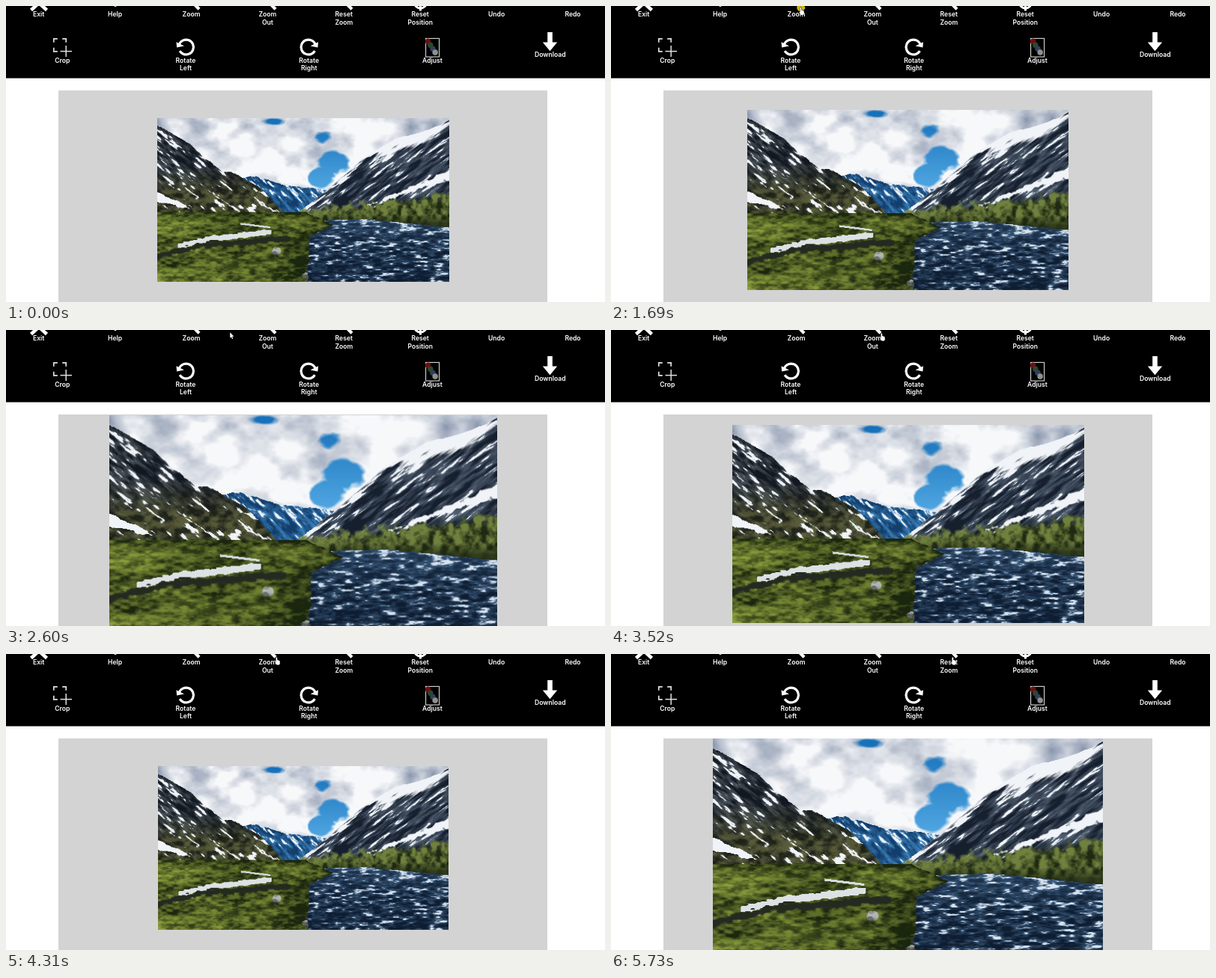
Recreate the animation shown at these times as an HTML page with a canvas. Size 800x396 px, loop 6.04 s.

```html
<!DOCTYPE html>
<html lang="en">
<head>
<meta charset="utf-8">
<title>Image editor zoom</title>
<style>
  html, body { margin: 0; width: 100%; height: 100%; overflow: hidden; background: #fff; }
  canvas { display: block; }
</style>
</head>
<body>
<canvas id="stage" width="800" height="396"></canvas>
<script>
const LOOP = 6040;
const ctx = document.getElementById('stage').getContext('2d');

const clamp = v => Math.max(0, Math.min(1, v));
const lerp = (a, b, k) => a + (b - a) * k;
const mix = (a, b, k) => a.map((v, i) => lerp(v, b[i], clamp(k)));
const ramp = (a, b, v) => clamp((v - a) / (b - a));

// height of a line through a few key points
function along(pts, x) {
  let i = 1;
  while (i < pts.length - 1 && pts[i][0] < x) i++;
  const [x0, y0] = pts[i - 1], [x1, y1] = pts[i];
  return lerp(y0, y1, ramp(x0, x1, x));
}

// ---------- noise ----------
function hash(x, y) {
  let h = Math.imul(x, 374761393) + Math.imul(y, 668265263);
  h = Math.imul(h ^ (h >>> 13), 1274126177);
  return ((h ^ (h >>> 16)) >>> 0) / 4294967296;
}
function noise(x, y) {
  const i = Math.floor(x), j = Math.floor(y);
  const ease = v => v * v * (3 - 2 * v);
  const u = ease(x - i), v = ease(y - j);
  return lerp(lerp(hash(i, j), hash(i + 1, j), u), lerp(hash(i, j + 1), hash(i + 1, j + 1), u), v);
}
function fbm(x, y) {
  let sum = 0;
  for (let o = 0, amp = 0.53; o < 4; o++, amp /= 2) sum += amp * noise(x * 2 ** o + o * 17, y * 2 ** o);
  return sum;
}
const contrast = (n, k) => clamp((n - 0.5) * k + 0.5);
// noise stretched along a slope
function grain(x, y, angle, long, thin) {
  const c = Math.cos(angle), s = Math.sin(angle);
  return fbm((x * c + y * s) / long, (y * c - x * s) / thin);
}

// ---------- landscape ----------
const PHOTO = { x: 161, y: 126.5, w: 471.5, h: 265.2 };
const SNOW = [240, 243, 247];
const NEAR = [[161, 138], [212, 167], [262, 210], [293, 246], [330, 281]];
const MID = [[245, 213], [283, 214], [330, 241], [366, 281]];
const FAR = [[296, 223], [320, 220], [362, 234], [432, 242]];
const RIGHT = [[386, 281], [434, 243], [497, 188], [545, 160], [600, 145], [632, 130]];
const SHORE = [[278, 400], [299, 444], [318, 406], [392, 403]];
const WATERLINE = [[400, 292], [500, 290], [632, 303]];
const HOLES = [[347, 131, 26, 9], [427, 158, 22, 13], [438, 192, 28, 20], [425, 222, 18, 20]];
const ROCKS = [[354, 341, 9], [402, 381, 7]];
const BRIGHT = [[161, 0.45], [225, 0.68], [290, 0.9], [460, 0.9], [540, 0.66], [632, 0.56]];

function sky(x, y) {
  const n = fbm(x / 38, y / 28);
  const hole = Math.max(...HOLES.map(([cx, cy, rx, ry]) => 1 - Math.hypot((x - cx) / rx, (y - cy) / ry)));
  const cloud = mix([116, 131, 158], [247, 248, 250], along(BRIGHT, x) + (n - 0.5) * 1.5);
  const blue = mix([22, 112, 186], [82, 168, 226], ramp(130, 245, y));
  return mix(cloud, blue, ramp(-0.02, 0.25, hole + (n - 0.5) * 1.8));
}

function farPeaks(x, y) {
  const n = grain(x, y, 0.8, 12, 4);
  const rock = mix([18, 62, 108], [62, 132, 190], contrast(n, 3));
  return mix(rock, SNOW, ramp(0.53, 0.6, n - (y - 234) * 0.006));
}

function leftSlope(x, y, depth) {
  const n = grain(x, y, 0.68, 16, 4), m = fbm(x / 9 + 40, y / 7);
  let color = mix([18, 24, 33], [82, 90, 98], contrast(n, 3));
  color = mix(color, mix([30, 34, 20], [96, 98, 58], contrast(m, 3)), ramp(205, 250, y) * 0.85);
  const patch = along([[161, 9], [212, 1]], x) - Math.abs(y - lerp(253, 272, ramp(161, 212, x)));
  if (x < 213 && patch + (m - 0.5) * 8 > 0) return SNOW;
  return mix(color, SNOW, ramp(0.58, 0.63, n - Math.abs(depth - 18) * 0.0017));
}

function rightSlope(x, y, depth) {
  const n = grain(x, y, -0.64, 26, 4.5), m = fbm(x / 8, y / 9);
  let color = mix([22, 31, 46], [88, 103, 121], contrast(n, 3));
  const cap = ramp(488, 540, x) * 20 * ramp(640, 590, x);
  color = mix(color, SNOW, Math.max(ramp(0.58, 0.63, n - depth * 0.0007), ramp(-3, 3, cap - depth + (n - 0.5) * 26)));
  const bush = mix([30, 41, 17], [112, 128, 62], contrast(m, 3));
  const treeline = along([[390, 280], [470, 272], [632, 250]], x);
  color = mix(color, bush, ramp(-6, 4, y - treeline + (m - 0.5) * 30));
  const band = lerp(1, 9, ramp(500, 632, x)) - Math.abs(y - lerp(266, 219, ramp(505, 632, x)));
  if (x > 500) color = mix(color, SNOW, ramp(0, 2, band + (m - 0.5) * 10));
  return mix(color, [28, 38, 18], ramp(282, 296, y) * 0.75);
}

function river(x, y) {
  const n = fbm(x / 11, y / 3.2), far = ramp(350, 292, y);
  const water = mix([14, 29, 49], [72, 108, 146], contrast(n, 2.8) * 0.75 + far * 0.4 - 0.1);
  return mix(water, [214, 226, 238], ramp(0.6, 0.72, n + far * 0.09 - 0.03));
}

function meadow(x, y, shore) {
  const n = fbm(x / 9, y / 4), m = fbm(x / 50, y / 18 + 9);
  const shade = ramp(288, 279, y) * 0.35 + ramp(50, 0, shore - x) * 0.38;
  let color = mix([27, 38, 14], [139, 158, 60], contrast(n, 2.4) * 0.6 + contrast(m, 2.5) * 0.45 - shade);
  const ditch = along([[161, 350], [235, 331], [375, 321]], x);
  if (x < 376) color = mix(color, [36, 42, 32], ramp(6, 3, Math.abs(y - ditch) + (n - 0.5) * 8));
  const ribbon = along([[194, 333], [240, 322], [345, 310]], x);
  if (x > 194 && x < 345 && Math.abs(y - ribbon) < 4 + (n - 0.5) * 6) color = [220, 225, 228];
  if (x > 295 && x < 343 && Math.abs(y - lerp(297, 303, ramp(295, 343, x))) < 1.4) color = [212, 220, 224];
  for (const [cx, cy, r] of ROCKS) {
    const d = Math.hypot(x - cx, (y - cy) * 1.4) + (n - 0.5) * 8;
    if (d < r) color = mix([60, 66, 62], [178, 182, 178], contrast(n, 3) + (cy - y) / r * 0.4);
  }
  return color;
}

function landscape(x, y) {
  const wobble = (fbm(x / 7, y / 7) - 0.5) * 9;
  const shore = along(SHORE, y) + wobble;
  if (y > 278 + wobble * 0.3 && x < shore) return meadow(x, y, shore);
  if (x > 396 && y > along(WATERLINE, x) + wobble * 0.2) return river(x, y);
  const depth = line => y - along(line, x) - wobble * 0.35;
  if (x > 386 && depth(RIGHT) > 0) return rightSlope(x, y, depth(RIGHT));
  if (x < 330 && depth(NEAR) > 0) return leftSlope(x, y, depth(NEAR));
  if (x > 245 && x < 366 && depth(MID) > 0) return leftSlope(x, y, depth(MID) + 14);
  if (x > 296 && x < 434 && depth(FAR) > 0) return farPeaks(x, y);
  return sky(x, y);
}

function paintPhoto() {
  const cv = document.createElement('canvas');
  cv.width = 521;
  cv.height = 293;
  const c = cv.getContext('2d'), img = c.createImageData(cv.width, cv.height);
  for (let j = 0, p = 0; j < cv.height; j++) {
    for (let i = 0; i < cv.width; i++, p += 4) {
      const rgb = landscape(PHOTO.x + i / cv.width * PHOTO.w, PHOTO.y + j / cv.height * PHOTO.h);
      img.data.set([...rgb, 255], p);
    }
  }
  c.putImageData(img, 0, 0);
  return cv;
}

// ---------- toolbar ----------
function trace(pts) {
  ctx.beginPath();
  for (let i = 0; i < pts.length; i += 2) ctx.lineTo(pts[i], pts[i + 1]);
}
function fill(color, pts) {
  trace(pts);
  ctx.fillStyle = color;
  ctx.fill();
}
function line(width, pts, color = '#fff') {
  trace(pts);
  ctx.strokeStyle = color;
  ctx.lineWidth = width;
  ctx.stroke();
}
function arc(width, x, y, r, from, to) {
  ctx.beginPath();
  ctx.arc(x, y, r, from, to);
  ctx.strokeStyle = '#fff';
  ctx.lineWidth = width;
  ctx.stroke();
}
function disc(color, x, y, r) {
  ctx.beginPath();
  ctx.arc(x, y, r, 0, 7);
  ctx.fillStyle = color;
  ctx.fill();
}

function label(text, x, y) {
  text.split(' ').forEach((word, i) => ctx.fillText(word, x, y + i * 10.3));
}
function labels(names, x, gap, y) {
  names.forEach((text, i) => label(text, x + i * gap, y));
}

function cropIcon(x, y) {
  for (const [sx, sy] of [[-1, -1], [1, -1], [-1, 1]]) {
    const cx = x + sx * 8.2, cy = y + sy * 8.5;
    line(1.7, [cx, cy - sy * 5, cx, cy, cx - sx * 5, cy], '#e0e0e0');
  }
  line(1.5, [x + 0.5, y + 8.3, x + 16, y + 8.3], '#e0e0e0');
  line(1.5, [x + 8.2, y + 0.7, x + 8.2, y + 15.7], '#e0e0e0');
}

function rotateIcon(x, dir) {
  ctx.save();
  ctx.translate(x, 55);
  ctx.scale(dir, 1);
  arc(3.2, 0, 0, 9.9, -2.75, 2.6);
  fill('#fff', [-13, -6.8, -2.6, -1.4, -12.4, 0.6]);
  ctx.restore();
}

function adjustIcon(x, y) {
  ctx.strokeStyle = '#d8d8d8';
  ctx.lineWidth = 1.1;
  ctx.strokeRect(x, y, 18, 24.6);
  ['#6d1010', '#2b472b', '#323f5c', '#8d918d']
    .forEach((color, i) => disc(color, x + 3 + i * 3.2, y + 4 + i * 4.9, 3.8));
}

function toolbar() {
  ctx.fillStyle = '#000';
  ctx.fillRect(0, 0, 800, 96.6);

  line(4.6, [33.5, 5.5, 44, -4, 54.5, 5.5]);
  disc('#fff', 146, -1, 2);
  for (let i = 0; i < 3; i++) line(4.2, [248 + i * 102, -6, 258 + i * 102, 4.2]);
  arc(3, 553.5, -5, 8, 0, Math.PI);
  line(3, [553.5, -6, 553.5, 6.5]);

  cropIcon(72, 52.3);
  rotateIcon(240.5, 1);
  rotateIcon(404, -1);
  adjustIcon(560.6, 43.4);
  line(6.6, [726.5, 35, 726.5, 50]);
  fill('#fff', [716.8, 48.6, 736.2, 48.6, 726.5, 60.2]);

  ctx.fillStyle = '#fff';
  ctx.font = '600 8.6px Inter, Open Sans, sans-serif';
  ctx.textAlign = 'center';
  labels(['Exit', 'Help', 'Zoom', 'Zoom Out', 'Reset Zoom', 'Reset Position', 'Undo', 'Redo'], 43.7, 101.9, 14.2);
  labels(['Crop', 'Rotate Left', 'Rotate Right', 'Adjust'], 75.3, 164.7, 76);
  label('Download', 726.8, 68.4);
}

// ---------- timeline ----------
const zoomIn = w => w * 1.0992, zoomOut = w => w * 0.908, reset = () => 521;
const CLICKS = [
  [1290, 1380, zoomIn], [1690, 1750, zoomIn], [2060, 2210, zoomIn],
  [3440, 3520, zoomOut], [3840, 3910, zoomOut], [4230, 4310, zoomOut],
  [5490, 5640, reset],
];
const IN = 253.5, OUT = 361.5, RESET = 456.5;
// start, end, steps, x, y
const MOVES = [
  [70, 600, 8, 291.5, 27], [690, 980, 5, IN, 2],
  [2370, 2920, 8, 345, 4.6], [2980, 3290, 5, OUT, 4.6],
  [4460, 5020, 8, 446, 4.6], [5100, 5260, 3, RESET, 4.6],
];

const widthAt = t => CLICKS.reduce((w, [, up, zoom]) => t >= up ? zoom(w) : w, 390);

function pointerAt(t) {
  let x = 474, y = 176;
  for (const [a, b, n, tx, ty] of MOVES) {
    if (t < a) break;
    const k = Math.min(n, Math.round(ramp(a, b, t) * (n - 1)) + 1) / n;
    x = lerp(x, tx, k);
    y = lerp(y, ty, k);
  }
  return [x, y];
}

function pointer(t) {
  if (t < MOVES[0][0]) return;
  const [x, y] = pointerAt(t);
  const hand = y < 20 && [IN, OUT, RESET].some(b => Math.abs(x - b) < 6);
  if (CLICKS.some(([down, up]) => t >= down && t < up)) disc('#cdb80c', x, y, 5.3);
  ctx.save();
  ctx.translate(x, y);
  const shape = hand
    ? [-1, 0, 0.6, 0, 0.8, 3.5, 4, 4.4, 4.4, 8, 3.4, 10, 0, 10, -2.2, 6.6, -1, 6, -1, 0]
    : [0, 0, 0, 7.2, 1.6, 5.9, 2.8, 8.8, 3.9, 8.3, 2.8, 5.4, 5, 5.2, 0, 0];
  line(1, shape, '#111');
  fill('#fff', shape);
  ctx.restore();
}

const photo = paintPhoto();

function draw(t) {
  ctx.fillStyle = '#fff';
  ctx.fillRect(0, 0, 800, 396);
  ctx.fillStyle = '#d3d3d3';
  ctx.fillRect(70, 113, 653, 283);
  const w = widthAt(t), h = w * 9 / 16;
  ctx.imageSmoothingQuality = 'high';
  ctx.drawImage(photo, 396.8 - w / 2, 259.5 - h / 2, w, h);
  toolbar();
  pointer(t);
}

const start = performance.now();
function tick() {
  draw((performance.now() - start) % LOOP);
  requestAnimationFrame(tick);
}
tick();
</script>
</body>
</html>
```
